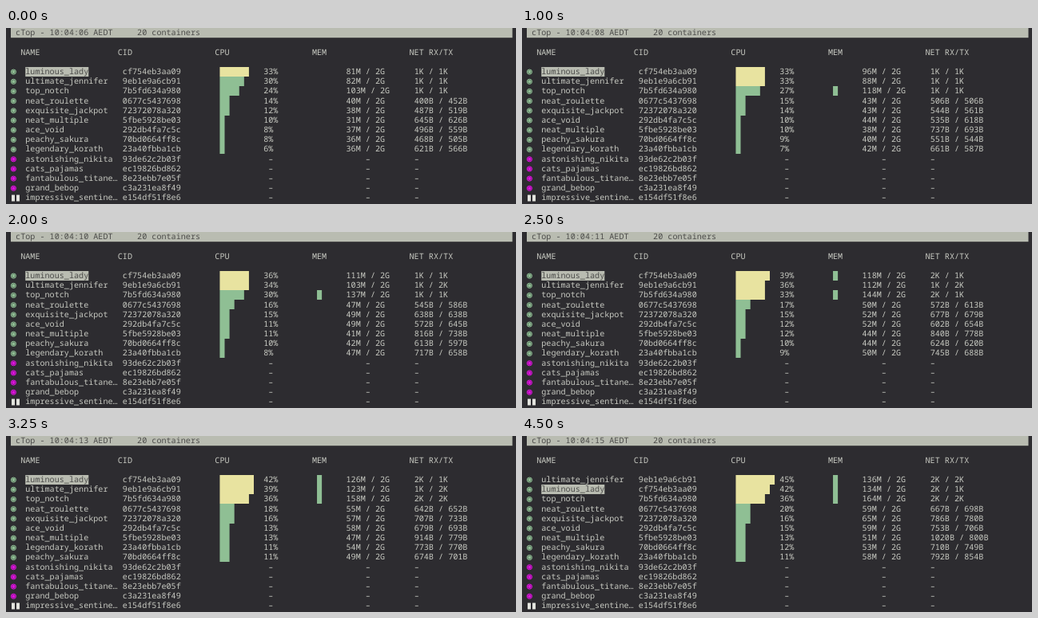
These frames come from a looping animation (638x221 px, 4.75 s). An HTML page:

```html
<!DOCTYPE html>
<html lang="en">
<head>
<meta charset="utf-8">
<title>Container monitor</title>
<style>
  html, body { margin: 0; width: 100%; height: 100%; overflow: hidden; background: #2d2c30; }
  svg { display: block; }
  text {
    font: 10.13px "Noto Sans Mono", "DejaVu Sans Mono", monospace;
    white-space: pre;
    text-rendering: geometricPrecision;
  }
</style>
</head>
<body>
<svg id="screen" width="638" height="221" viewBox="0 0 638 221"></svg>
<script>
const screenSvg = document.getElementById('screen');
const LOOP = 4750;
const CELL = 6.08, LINE = 12.18, LEFT = 6;
const GAUGE_CELLS = 19;
const FG = '#c8cac2', BG = '#2d2c30', LIGHT = '#b9bcb1', INK = '#4c4c4a';
const GREEN = '#8fbf94', YELLOW = '#e8e3a0', MAGENTA = '#e010e0';

// Seconds on the clock at which readings are known; others are interpolated.
const SAMPLES = [6, 8, 9, 11, 13, 14, 15];
const series = text => text.split(' ').map(Number);
const running = (name, id, unit, cpu, mem, rx, tx) => ({
  name, id, unit, cpu: series(cpu), mem: series(mem), rx: series(rx), tx: series(tx)
});

const active = [
  running('luminous_lady', 'cf754eb3aa09', 'K', '33 33 33 39 42 42 42',
    '81 96 104 118 126 126 134', '1 1 1 2 2 2 2', '1 1 1 1 1 1 1'),
  running('ultimate_jennifer', '9eb1e9a6cb91', 'K', '30 33 33 36 39 42 45',
    '82 88 94 112 123 127 136', '1 1 1 1 1 1 2', '1 1 2 2 2 2 2'),
  running('top_notch', '7b5fd634a980', 'K', '24 27 27 33 36 36 36',
    '103 118 130 144 158 164 164', '1 1 1 2 2 2 2', '1 1 1 1 2 2 2'),
  running('neat_roulette', '0677c5437698', 'B', '14 15 15 17 18 19 20',
    '40 43 45 50 55 55 59', '400 506 518 572 642 660 667', '452 506 560 613 652 672 698'),
  running('exquisite_jackpot', '72372078a320', 'B', '12 14 15 15 16 16 16',
    '38 43 46 52 57 61 65', '487 544 600 677 707 740 786', '519 561 597 679 733 762 780'),
  running('neat_multiple', '5fbe5928be03', 'B', '10 10 10 12 13 13 13',
    '31 38 39 44 47 49 51', '645 737 793 840 914 961 1020', '626 693 699 778 779 799 800'),
  running('ace_void', '292db4fa7c5c', 'B', '8 10 11 12 13 14 15',
    '37 44 47 52 58 59 59', '496 535 542 602 679 734 753', '559 618 636 654 693 697 706'),
  running('peachy_sakura', '70bd0664ff8c', 'B', '8 9 10 10 11 11 12',
    '36 40 41 44 49 51 53', '468 551 603 624 674 685 710', '505 544 575 620 701 713 749'),
  running('legendary_korath', '23a40fbba1cb', 'B', '6 7 8 9 11 11 11',
    '36 42 45 50 54 58 58', '621 661 690 745 773 773 792', '566 587 629 688 770 826 854')
];

const idle = [
  ['astonishing_nikita', '93de62c2b03f'],
  ['cats_pajamas', 'ec19826bd862'],
  ['fantabulous_titane…', '8e23ebb7e05f'],
  ['grand_bebop', 'c3a231ea8f49'],
  ['impressive_sentine…', 'e154df51f8e6']
];

const x = col => LEFT + col * CELL;
const y = line => line * LINE;
const rect = (left, top, w, h, fill) =>
  `<rect x="${left}" y="${top}" width="${w}" height="${h}" fill="${fill}"/>`;
const label = (col, line, text, fill = FG) =>
  `<text x="${x(col)}" y="${y(line) + 9.3}" fill="${fill}">${text}</text>`;
const gaugeCells = percent => Math.floor(percent * GAUGE_CELLS / 100);

// Edges snap to whole pixels so that stacked blocks meet without seams.
function block(col, line, cells, fill) {
  const top = Math.round(y(line));
  return rect(x(col), top, cells * CELL, Math.round(y(line + 1)) - top, fill);
}

function statusDot(line, color) {
  const cy = y(line) + 6.4;
  return `<circle cx="9.4" cy="${cy}" r="3.1" fill="${color}" fill-opacity=".35" stroke="${color}"/>` +
    `<circle cx="9.4" cy="${cy}" r="2" fill="${color}"/>`;
}

function reading(values, second) {
  const i = SAMPLES.findIndex(s => s >= second);
  if (SAMPLES[i] === second) return values[i];
  const part = (second - SAMPLES[i - 1]) / (SAMPLES[i] - SAMPLES[i - 1]);
  return Math.floor(values[i - 1] + (values[i] - values[i - 1]) * part);
}

function activeRow(item, line, second) {
  const [mem, rx, tx] = [item.mem, item.rx, item.tx].map(v => reading(v, second));
  const memPercent = Math.round(mem / 20.48);
  const selected = item.name === 'luminous_lady';
  return statusDot(line, GREEN) +
    (selected ? block(3, line, item.name.length, LIGHT) : '') +
    label(3, line, item.name, selected ? INK : FG) +
    label(23, line, item.id) +
    block(43, line, gaugeCells(item.now), item.now > 30 ? YELLOW : GREEN) +
    label(52, line, item.now + '%') +
    block(63, line, gaugeCells(memPercent), GREEN) +
    label(69, line, `${mem}M / 2G`) +
    label(83, line, `${rx}${item.unit} / ${tx}${item.unit}`);
}

function idleRow([name, id], line) {
  const paused = name.startsWith('impressive');
  const icon = paused
    ? [7, 13].map(left => rect(left, y(line) + 2.5, 4, 8, '#e2e3dd')).join('')
    : statusDot(line, MAGENTA);
  return icon + label(3, line, name) + label(23, line, id) +
    [53, 73, 83].map(col => label(col, line, '–')).join('');
}

function draw(second) {
  const clock = '10:04:' + String(second).padStart(2, '0');
  const rows = active
    .map(item => ({ ...item, now: reading(item.cpu, second) }))
    .sort((a, b) => b.now - a.now || (a.name < b.name ? -1 : 1));
  const heads = [[2, 'NAME'], [22, 'CID'], [42, 'CPU'], [62, 'MEM'], [82, 'NET RX/TX']];
  screenSvg.innerHTML =
    rect(0, 0, 638, 221, BG) +
    rect(LEFT, 0, 627.5, 12.2, LIGHT) +
    label(1, 0, `cTop - ${clock} AEDT`, INK) +
    label(26, 0, '20 containers', INK) +
    heads.map(([col, text]) => label(col, 2, text)).join('') +
    rows.map((item, i) => activeRow(item, 4 + i, second)).join('') +
    idle.map((item, i) => idleRow(item, 4 + rows.length + i)).join('');
}

const start = performance.now();
let shown = -1;
function update() {
  const time = (performance.now() - start) % LOOP;
  const second = 6 + Math.floor((time + 250) / 500);
  if (second !== shown) draw(shown = second);
  requestAnimationFrame(update);
}
update();
</script>
</body>
</html>
```
